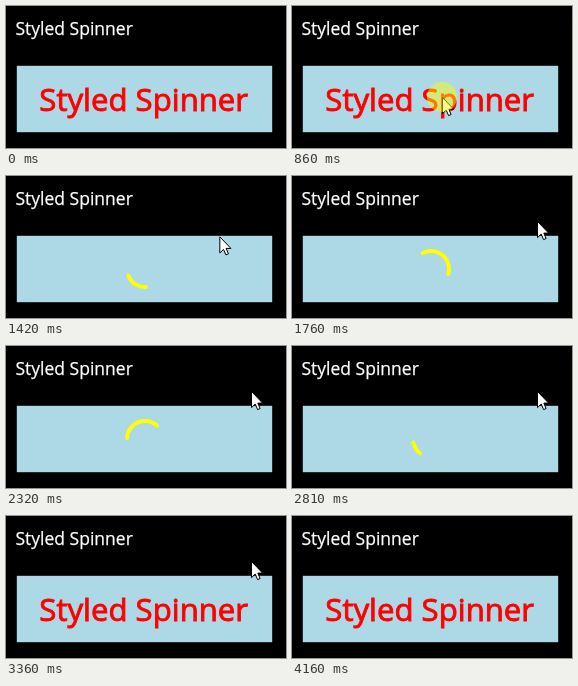
These frames come from a looping animation (280x142 px, 4750 ms). An HTML page:

```html
<!DOCTYPE html>
<html lang="en">
<head>
<meta charset="utf-8">
<title>Styled Spinner</title>
<style>
  html, body { margin: 0; width: 100%; height: 100%; overflow: hidden; background: #000; }
  svg { display: block; width: 100%; height: 100%; }
  text { font-family: "Open Sans", "Noto Sans", sans-serif; }
</style>
</head>
<body>
<svg viewBox="0 0 280 142">
  <rect width="280" height="142"/>
  <text x="9.5" y="28.5" font-size="17.5" fill="#fff" stroke="#fff" stroke-width=".25">Styled Spinner</text>
  <rect x="10.8" y="59.8" width="255.4" height="66.4" fill="#add8e6"/>
  <text id="label" x="33.3" y="105" font-size="31.15" fill="#f00" stroke="#f00" stroke-width=".9">Styled Spinner</text>
  <circle id="arc" cx="139" cy="93" r="18" fill="none" stroke="#ff0" stroke-width="4" stroke-linecap="round"/>
  <path id="cursor" d="M.5 .5V16.6L4.2 13.1L6.6 18.6L9.1 17.5L6.8 12.1H11.6Z" fill="#fff" stroke="#000"/>
  <circle id="click" cx="150" cy="91" r="15" fill="#ff0" fill-opacity=".47"/>
</svg>
<script>
const LOOP = 4750;
const TICK = 69;
const CLICK = 860, LOAD = 1000, LABEL_BACK = 3160, SPIN_END = 3300;
const ENTER = 200, MOVE = 1140, LEAVE = 3821, GONE = 4160;

const OUTSIDE = [207, 122], BUTTON = [150, 91], REST = [245, 45], BELOW = [258, 140];

const $ = id => document.getElementById(id);
const [label, arc, cursor, click] = ["label", "arc", "cursor", "click"].map($);

const show = (el, on) => el.setAttribute("visibility", on ? "visible" : "hidden");

// Time since start, held for one tick at a time
const held = (t, start) => Math.floor((t - start) / TICK) * TICK;

// Point on the straight way from a to b, taking the given number of ticks
function glide(t, start, ticks, a, b) {
  const u = Math.min(1, held(t, start) / (ticks * TICK));
  return a.map((v, i) => v + (b[i] - v) * u);
}

function pointer(t) {
  if (t < MOVE) return glide(t, ENTER, 2, OUTSIDE, BUTTON);
  if (t < LEAVE) return glide(t, MOVE, 6, BUTTON, REST);
  return glide(t, LEAVE, 5, REST, BELOW);
}

// Grows to a half circle over 450 degrees, then shrinks over 630 more
function drawSpinner(t) {
  const p = Math.max(0, held(t, LOAD) - 20) / 2000 % 1;
  const turn = p < .5 ? 900 * p : 450 + 1260 * (p - .5);
  const sweep = Math.max(.01, 1 - Math.abs(2 * p - 1)) * Math.PI * 18;
  arc.setAttribute("stroke-dasharray", `${sweep} 200`);
  arc.setAttribute("transform", `rotate(${turn - 90} 139 93)`);
}

function draw(t) {
  show(label, t < LOAD || t >= LABEL_BACK);
  show(click, t >= CLICK && t < LOAD);
  show(arc, t >= LOAD && t < SPIN_END);
  show(cursor, t >= ENTER && t < GONE);
  drawSpinner(t);
  cursor.setAttribute("transform", `translate(${pointer(t)})`);
}

function frame() {
  draw(performance.now() % LOOP);
  requestAnimationFrame(frame);
}
frame();
</script>
</body>
</html>
```
